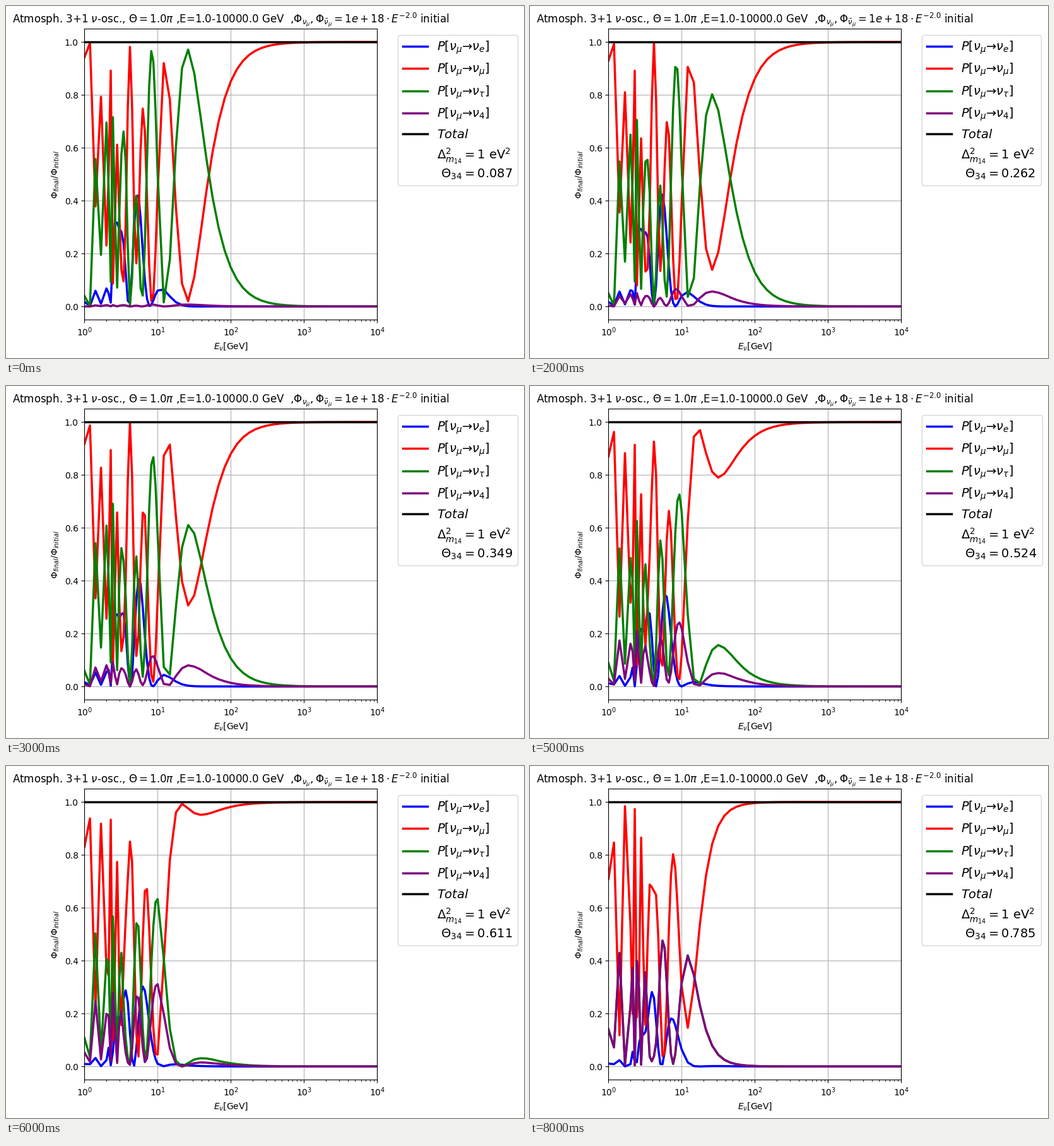
A matplotlib script for the animation above (9000 ms loop, 821 by 559 pixels).

```python
import numpy as np
import matplotlib.pyplot as plt
from matplotlib.animation import FuncAnimation

W, H, DPI = 821, 559, 100
LEFT, TOP, AX_W, AX_H = 124.35, 36.2, 464, 462

# The mixing angle grows by five degrees per step
FRAMES = 9
THETA34 = np.radians(5 * np.arange(1, FRAMES + 1))

# Energy nodes in GeV: coarse, fine around the resonances, coarse again
ENERGY = np.concatenate([
    np.geomspace(1, 2, 5)[:-1],
    np.geomspace(2, 10, 25)[:-1],
    np.geomspace(10, 1e4, 37),
])

# Mixing parameters; mass splittings in eV^2
TH12, TH13, TH23 = 0.583996, 0.148190, 0.737324
DM2 = np.diag([0, 7.5e-5, 2.57e-3, 1.0])
KIN = 2.53387      # eV^2/GeV -> 1/km
POT = 3.868e-4     # g/cm^3 -> 1/km
R_INNER, R_CORE, R_LOWER, R_EARTH, ATM = 1221.5, 3480, 5701, 6371, 22


def density(r):
    """Earth's density (g/cm^3) at radius r in km."""
    x = r / R_EARTH
    if r < R_INNER:
        return 13.0885 - 8.8381 * x**2
    if r < R_CORE:
        return 12.5815 - 1.2638 * x - 3.6426 * x**2 - 5.5281 * x**3
    if r < R_LOWER:
        return 7.9565 - 6.4761 * x + 5.5283 * x**2 - 3.0807 * x**3
    return 10.7 - 7.5 * x


def slices(step=50):
    """Thin layers (thickness, mid radius) from the surface to the centre."""
    bounds = [R_EARTH, R_LOWER, R_CORE, R_INNER, 0]
    for outer, inner in zip(bounds, bounds[1:]):
        n = int(np.ceil((outer - inner) / step))
        d = (outer - inner) / n
        for i in range(n):
            yield d, outer - d * (i + 0.5)


def rot(i, j, angle):
    m = np.eye(4)
    m[i, i] = m[j, j] = np.cos(angle)
    m[i, j], m[j, i] = np.sin(angle), -np.sin(angle)
    return m


def evolve(ham, length):
    w, v = np.linalg.eigh(ham)
    phase = np.exp(-1j * w * length)
    return (v * phase[..., None, :]) @ v.swapaxes(-1, -2)


def probabilities():
    """P(nu_mu -> e, mu, tau, s), shaped (angle, energy, flavour)."""
    u3 = rot(1, 2, TH23) @ rot(0, 2, TH13) @ rot(0, 1, TH12)
    mixings = [rot(2, 3, t) @ u3 for t in THETA34]
    mass = np.array([u @ DM2 @ u.T for u in mixings])
    h0 = KIN * mass[:, None] / ENERGY[None, :, None, None]
    half = np.eye(4)
    for d, r in slices():
        ye = 0.4656 if r < R_CORE else 0.4957
        pot = POT * density(r) * np.diag([ye, 0, 0, (1 - ye) / 2])
        half = evolve(h0 + pot, d) @ half
    # The second half of the path mirrors the first
    total = half.swapaxes(-1, -2) @ half @ evolve(h0, ATM)
    return np.abs(total[..., 1])**2


def params(angle):
    return ("$\\Delta^2_{m_{14}}=1$ eV$^2$\n"
            " $\\Theta_{34}=%.3f$" % angle)


PROB = probabilities()

fig = plt.figure(figsize=(W / DPI, H / DPI), dpi=DPI, facecolor="white")
ax = fig.add_axes([LEFT / W, 1 - (TOP + AX_H) / H, AX_W / W, AX_H / H])
ax.set_xscale("log")
ax.set_xlim(1, 1e4)
ax.set_ylim(-0.05, 1.05)
ax.grid(True)
ax.set_xlabel(r"$E_\nu$[GeV]")
ax.set_ylabel(r"$\Phi_{final}/\Phi_{initial}$")
ax.set_title(r"Atmosph. 3+1 $\nu$-osc., $\Theta=1.0\pi$ ,E=1.0-10000.0 GeV  ,"
             r"$\Phi_{\nu_\mu},\Phi_{\bar{\nu}_\mu}=1e+18\cdot E^{-2.0}$ initial",
             fontsize=12)

lines = []
for color, flavour in zip(["blue", "red", "green", "purple"],
                          ["e", r"\mu", r"\tau", "4"]):
    label = r"$P[\nu_\mu→\nu_{%s}]$" % flavour
    lines += ax.plot(ENERGY, ENERGY * 0, color=color, lw=2.5, label=label)
ax.plot(ENERGY, np.ones_like(ENERGY), color="black", lw=2.5, label="$Total$")
ax.plot([], [], " ", label=params(THETA34[0]))

legend = ax.legend(bbox_to_anchor=(1.05, 1), loc="upper left", fontsize=14)
note = legend.get_texts()[-1]


def update(k):
    for i, line in enumerate(lines):
        line.set_ydata(PROB[k, :, i])
    note.set_text(params(THETA34[k]))
    return lines + [note]


anim = FuncAnimation(fig, update, frames=FRAMES, interval=1000,
                     repeat=True, repeat_delay=0, blit=False)
plt.show()
```
